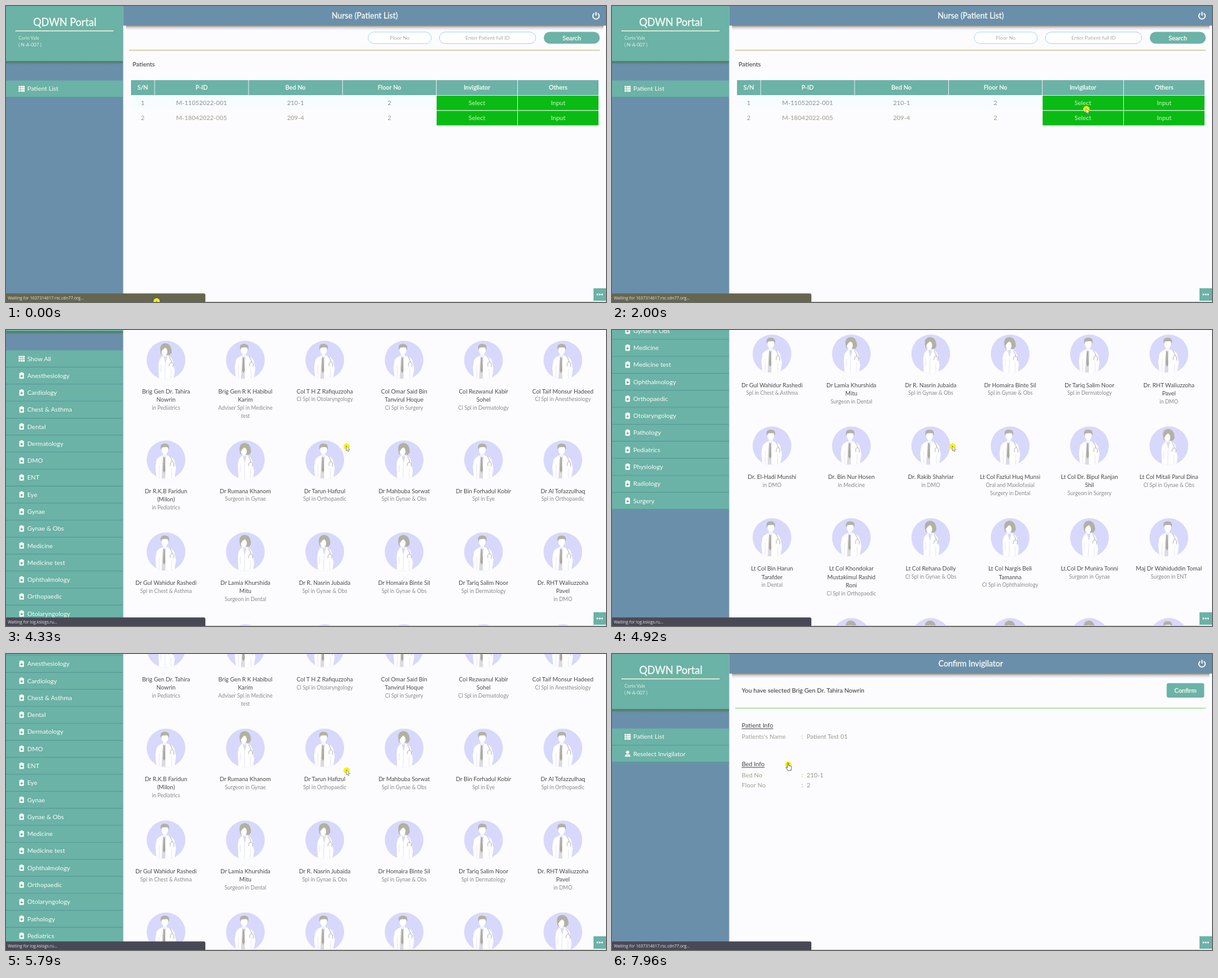
These frames come from a looping animation (960 px wide and 475 px high, 8 s). An HTML page:

```html
<!DOCTYPE html>
<html lang="en">
<head>
<meta charset="utf-8">
<title>Portal</title>
<style>
  html, body { margin: 0; width: 100%; height: 100%; overflow: hidden; background: #fcfcfe; }
  svg { display: block; width: 100vw; height: 100vh; }
  text { font-family: Lato, "Open Sans", sans-serif; white-space: pre; }
  .semi { stroke-width: .28px; }
  .status { font-family: "Open Sans", "Noto Sans", sans-serif; }
</style>
</head>
<body>
<svg id="stage" viewBox="0 0 960 475" xmlns="http://www.w3.org/2000/svg"></svg>
<script>
const TEAL = '#6bb2a7', BLUE = '#6a8fab', PALE = '#fbfdf5', GREEN = '#0abb14';
const LOOP = 8000;

// Markup helpers: text is placed by the middle of its capitals.
const rect = (x, y, w, h, fill, extra = '') =>
  `<rect x="${x}" y="${y}" width="${w}" height="${h}" fill="${fill}" ${extra}/>`;
const text = (x, y, size, str, fill, { mid = false, semi = false, line = false } = {}) =>
  `<text x="${x}" y="${y + size * 0.35}" font-size="${size}" fill="${fill}"` +
  (mid ? ' text-anchor="middle"' : '') +
  (semi ? ` class="semi" stroke="${fill}"` : '') +
  (line ? ' text-decoration="underline"' : '') +
  `>${str.replace(/&/g, '&amp;')}</text>`;
const use = (id, x, y) => `<use href="#${id}" x="${x}" y="${y}"/>`;
const group = (id, body) => `<g id="${id}">${body}</g>`;
const field = (x, y, w, hint, border) =>
  rect(x + .5, y, w - 1, 18.5, '#fff', `rx="9.2" stroke="${border}" stroke-width=".9"`) +
  text(x + w / 2, y + 9.2, 8.2, hint, '#a8a8a8', { mid: true });
const button = (x, y, w, h, r, label) =>
  rect(x, y, w, h, TEAL, `rx="${r}"`) + text(x + w / 2, y + h / 2, 10, label, PALE, { mid: true, semi: true });

const defs = `<defs>
  <linearGradient id="headShade" x2="0" y2="1">
    <stop offset="0" stop-color="#838e9c"/><stop offset=".28" stop-color="#c6ba96"/>
    <stop offset=".5" stop-color="#d9daf2"/><stop offset="1" stop-color="#fcfcfe"/>
  </linearGradient>
  <linearGradient id="sideShade" x2="0" y2="1">
    <stop offset="0" stop-color="#3c7452"/><stop offset=".4" stop-color="#55806f"/><stop offset="1" stop-color="${BLUE}"/>
  </linearGradient>
  <clipPath id="disc"><circle r="31"/></clipPath>
  <g id="m">
    <circle r="31" fill="#d8d8fc"/>
    <g clip-path="url(#disc)">
      <path d="M-15 31L-17 12-15 0Q-13-4-6-7H2Q10-5 13 0L16 14 13 31Z" fill="#fff"/>
      <path d="M-5-6H0L-1 8V30H-7L-6 8Z" fill="#dadae2"/>
      <path d="M-4-4H-2L-1 17-3 21-5 17Z" fill="#aaa99c"/>
      <path d="M-11 8V31M9 14V31" stroke="#e4e4fb" fill="none"/>
    </g>
    <path d="M-5-12H1V-7L-2-4-5-7Z" fill="#f4f4fc"/>
    <ellipse cx="-2" cy="-16" rx="5.4" ry="7" fill="#fff"/>
    <path d="M-8-16Q-11-26-2-26 7-26 4.500-16L3-20Q-2-21-6.500-19.500Z" fill="#b2b1a3"/>
    <path d="M6-6Q10 0 10 3M7 10Q6 3 10 3 14 4 12 11" fill="none" stroke="#aaa" stroke-width=".9"/>
  </g>
  <g id="f">
    <circle r="31" fill="#d8d8fc"/>
    <path d="M-8-9Q-13-26-1-27 9-26 9-12L6-8Z" fill="#b2b1a3"/>
    <g clip-path="url(#disc)">
      <path d="M-11 31L-12 10Q-12-4-4-7H3Q10-4 11 2L14 18 12 31Z" fill="#fff"/>
      <path d="M-4-6L-1 6 2-6Z" fill="#dcdcf0"/>
      <path d="M-1 6L-2 31M-8 8V20M8 14V31" stroke="#e4e4fb" fill="none"/>
    </g>
    <ellipse cx="-2.500" cy="-13.500" rx="4.800" ry="6.500" fill="#fff"/>
    <path d="M-7.500-13Q-5-18 0-21 4-18 4-10L8-11 6-23-3-26-9-18Z" fill="#b2b1a3"/>
    <path d="M5-5Q9 0 9 4M5 10Q5 3 9 4 13 5 11 11" fill="none" stroke="#aaa" stroke-width=".9"/>
  </g>
  <g id="clip">
    <rect x="-3.700" y="-4.300" width="7.400" height="9.400" rx="1" fill="${PALE}"/>
    <rect x="-1.500" y="-5.300" width="3" height="2" rx=".7" fill="${PALE}"/>
    <path d="M-2 1H2M0-1V3" stroke="#5b9d93" stroke-width="1.200"/>
  </g>
  <g id="grid"><path d="M-5-3H5M-5 0.300H5M-5 3.600H5" stroke="${PALE}" stroke-width="2.600" stroke-dasharray="2.900 .65"/></g>
  <g id="list"><path d="M-5-3H5M-5 0.300H5M-5 3.600H5" stroke="${PALE}" stroke-width="2.600" stroke-dasharray="2.900 .65 6.500 0"/></g>
  <g id="person">
    <circle cy="-2.200" r="2.600" fill="${PALE}"/><path d="M-4.500 5Q-4.500 1 0 1 4.500 1 4.500 5Z" fill="${PALE}"/>
    <path d="M0 2V4" stroke="${TEAL}"/>
  </g>
</defs>`;

const menu = items => items.map(([icon, label], i) => {
  const y = 119.5 + i * 27.28;
  return rect(0, y, 187, 27.28, TEAL) + rect(0, y + 26.4, 187, .9, '#4f938f') +
    use(icon, 25, y + 13) + text(34, y + 13.2, 10.1, label, PALE);
}).join('');

function patientPage() {
  const columns = [[200, 37.5, 'S/N'], [238.3, 149.4, 'P-ID'], [388.5, 149.5, 'Bed No'],
    [538.8, 149.4, 'Floor No'], [689, 129, 'Invigilator'], [818.8, 129.2, 'Others']];
  const rows = [['1', 'M-11052022-001', '210-1', '2', 'Select', 'Input'],
    ['2', 'M-18042022-005', '209-4', '2', 'Select', 'Input']];
  let table = rect(200, 143.5, 488, 23.5, '#f7fcff');
  columns.forEach(([x, w, label], c) => {
    const center = x + w / 2;
    table += rect(x, 119, w, 24, TEAL) + text(center, 131, 9.8, label, PALE, { mid: true, semi: true });
    rows.forEach((row, r) => {
      if (c > 3) table += rect(x, 143.8 + r * 24.4, w, 23.4, GREEN);
      table += text(center, 155.5 + r * 24.4, 10.1, row[c], c > 3 ? '#cff3c9' : ['#8f8f92', '#9f9a86'][r], { mid: true });
    });
  });
  return menu([['list', 'Patient List']]) +
    field(579, 41.8, 102, 'Floor No', '#a9d3ef') +
    field(693, 41.8, 155, 'Enter Patient full ID', '#a9c9ef') +
    button(860.5, 41.5, 89.5, 19, 9.5, 'Search') +
    rect(197, 70.3, 753, 1.4, '#c6c492') + text(202.500, 93.5, 10, 'Patients', '#333') + table;
}

// Each row: middle of its pictures, then cards of picture, name lines, specialty lines.
const doctors = [
  [135,
    'f|Brig Gen Dr. Tahira/Nowrin|in Pediatrics', 'm|Brig Gen R K Habibul/Karim|Adviser Spl in Medicine/test',
    'm|Col T H Z Rafiquzzoha|Cl Spl in Otolaryngology', 'm|Col Omar Said Bin/Tanvirul Hoque|Cl Spl in Surgery',
    'm|Col Rezwanul Kabir/Sohel|Cl Spl in Dermatology', 'm|Col Taif Monsur Hadeed|Cl Spl in Anesthesiology'],
  [295,
    'm|Dr R.K.B Faridun/(Milon)|in Pediatrics', 'f|Dr Rumana Khanom|Surgeon in Gynae',
    'm|Dr Tarun Hafizul|Spl in Orthopaedic', 'f|Dr Mahbuba Sorwat|Spl in Gynae & Obs',
    'm|Dr Bin Forhadul Kobir|Spl in Eye', 'm|Dr Al Tofazzulhaq|Spl in Orthopaedic'],
  [442.5,
    'm|Dr Gul Wahidur Rashedi|Spl in Chest & Asthma', 'f|Dr Lamia Khurshida/Mitu|Surgeon in Dental',
    'f|Dr R. Nasrin Jubaida|Spl in Gynae & Obs', 'f|Dr Homaira Binte Sil|Spl in Gynae & Obs',
    'm|Dr Tariq Salim Noor|Spl in Dermatology', 'm|Dr. RHT Waliuzzoha/Pavel|in DMO'],
  [590,
    'm|Dr. El-Hadi Munshi|in DMO', 'm|Dr. Bin Nur Hosen|in Medicine', 'm|Dr. Rakib Shahriar|in DMO',
    'm|Lt Col Fazlul Huq Munsi|Oral and Maxilofasial/Surgery in Dental',
    'm|Lt Col Dr. Bipul Ranjan/Shil|Surgeon in Surgery', 'f|Lt Col Mitali Parul Dina|Cl Spl in Gynae & Obs'],
  [737.3,
    'm|Lt Col Bin Harun/Tarafder|in Dental', 'm|Lt Col Khondokar/Mustakimul Rashid/Roni|Cl Spl in Orthopaedic',
    'f|Lt Col Rehana Dolly|Cl Spl in Gynae & Obs', 'f|Lt Col Nargis Beli/Tamanna|Cl Spl in Ophthalmology',
    'f|Lt.Col Dr Munira Tonni|Surgeon in Gynae', 'm|Maj Dr Wahiduddin Tomal|Surgeon in ENT'],
  [897.5, 'm||', 'f||', 'f||', 'f||', 'f||', 'm||']
];

function doctorPage() {
  const departments = ['Anesthesiology', 'Cardiology', 'Chest & Asthma', 'Dental', 'Dermatology', 'DMO', 'ENT',
    'Eye', 'Gynae', 'Gynae & Obs', 'Medicine', 'Medicine test', 'Ophthalmology', 'Orthopaedic',
    'Otolaryngology', 'Pathology', 'Pediatrics', 'Physiology', 'Radiology', 'Surgery'];
  const cards = doctors.map(([y, ...row]) => row.map((card, c) => {
    const x = 256 + c * 127, [picture, name, specialty] = card.split('|');
    const names = name.split('/'), lines = names.concat(specialty.split('/'));
    return use(picture, x, y) + lines.map((line, i) => i < names.length
      ? text(x, y + 50 + i * 13.4, 9.3, line, '#4a4a4a', { mid: true })
      : text(x, y + 50 + i * 13.2, 8.5, line, '#8a8a8a', { mid: true })).join('');
  }).join('')).join('');
  return menu([['grid', 'Show All'], ...departments.map(d => ['clip', d])]) +
    text(207.5, 61, 9.9, 'Search Doctor', '#777') +
    field(318, 51.7, 562, 'Enter Doctor Name or ID', '#bfc0ee') +
    button(890, 51.7, 50, 18.6, 9.3, 'Search') + cards;
}

function confirmPage() {
  const info = [[132, "Patients's Name", 'Patient Test 01'], [194, 'Bed No', '210-1'], [210.5, 'Floor No', '2']];
  return menu([['list', 'Patient List'], ['person', 'Reselect Invigilator']]) +
    text(207.5, 59, 9.9, 'You have selected Brig Gen Dr. Tahira Nowrin', '#333') +
    button(887.5, 46.7, 60, 23.4, 3, 'Confirm') + rect(197, 86.2, 753, 1.5, '#a9d79a') +
    text(207.5, 115, 9.9, 'Patient Info', '#444', { line: true }) +
    text(207.5, 177, 9.9, 'Bed Info', '#444', { line: true }) +
    info.map(([y, label, value]) => text(207.5, y, 10, label, '#a19d92') +
      text(303, y, 10, ':', '#a19d92') + text(311.5, y, 10, value, '#99968c')).join('');
}

const header = rect(192, 31, 764, 8, 'url(#headShade)') + rect(187.5, 0, 772.5, 31.5, BLUE) +
  text(574, 15.5, 12.7, '', PALE, { mid: true, semi: true }).replace('<text', '<text id="title"') +
  `<path d="M941.200 11.800A5 5 0 1 0 946.800 11.800M944 9.500V15.500" fill="none" stroke="${PALE}" stroke-width="1.800"/>` +
  rect(0, 88, 187, 6, 'url(#sideShade)') + rect(0, 0, 187, 88.5, TEAL) +
  text(94, 26.5, 16.3, 'QDWN Portal', PALE, { mid: true, semi: true }) +
  rect(15, 39.200, 157, 1.500, '#f3f5d8') +
  text(20, 51, 7.4, 'Corin Vale', '#e6f2dc') + text(20, 62, 7.4, '( N-A-007 )', '#e6f2dc');

const overlay = rect(187, 474, 773, 1, '#cfd0d8') + rect(940, 453, 20, 20, TEAL) +
  [946.3, 950, 953.7].map(x => `<circle cx="${x}" cy="463" r="1.400" fill="${PALE}"/>`).join('') +
  group('status', rect(-4, 461.3, 323, 18, '#494956', 'id="bar" rx="2.5"') +
    '<text id="message" class="status" x="3" y="470.800" font-size="6.600" fill="#e4e4e0"></text>') +
  group('cursor', '<circle r="5" fill="#f6f400"/>' +
    '<path id="arrow" d="M-.5-1V7L1.300 5.500 2.500 8.300 3.800 7.700 2.600 5H5.200Z" fill="#fff" stroke="#555" stroke-width=".6"/>' +
    '<path id="hand" d="M-1.300-2.500Q-.3-3.600.6-2.500V1.500L4.500 2.500Q5.500 3 5.300 5L4.300 9.500H-.5L-3.800 4.600Q-3.300 3.200-1.300 5Z" fill="#fff" stroke="#444" stroke-width=".8"/>');

const stage = document.getElementById('stage');
stage.innerHTML = defs + rect(0, 0, 960, 475, '#fcfcfe') + rect(0, 0, 187.5, 475, BLUE) +
  group('scroller', header + group('patients', patientPage()) +
    group('doctors', doctorPage()) + group('confirm', confirmPage())) + overlay;

const el = id => document.getElementById(id);
const show = (id, on) => el(id).setAttribute('display', on ? 'inline' : 'none');

// Keys are [time, value]; each span eases by the given curve.
function tween(keys, t, ease = k => k) {
  const i = keys.findIndex(key => key[0] > t);
  if (i === 0) return keys[0][1];
  if (i < 0) return keys[keys.length - 1][1];
  const [t0, a] = keys[i - 1], [t1, b] = keys[i];
  return a + (b - a) * ease((t - t0) / (t1 - t0));
}
const smooth = k => k * k * (3 - 2 * k);

const cursorKeys = [[130, 241, 474], [940, 190, 212], [1750, 808, 175], [2000, 759, 165.5], [2170, 760.5, 160],
  [3600, 760.5, 160], [4130, 545, 187], [6400, 545, 187], [7100, 282, 177.5]];
const cursorX = cursorKeys.map(([t, x]) => [t, x]);
const cursorY = cursorKeys.map(([t, , y]) => [t, y]);
const scrollKeys = [[4170, 0], [4920, 404], [5040, 430], [5200, 430], [5790, 144.5], [6200, 8], [6380, .6], [6420, 0]];
const statusFade = [[2080, 1], [2170, 0], [2540, 0], [2630, 1]];

const pages = [[0, 'patients', 'Nurse (Patient List)'], [3330, 'doctors', 'Doctor Selection'],
  [7540, 'confirm', 'Confirm Invigilator']];

function draw(t) {
  const page = pages.filter(p => p[0] <= t).pop();
  pages.forEach(p => show(p[1], p === page));
  el('title').textContent = page[2];
  el('scroller').setAttribute('transform', `translate(0 ${-tween(scrollKeys, t)})`);

  el('cursor').setAttribute('transform', `translate(${tween(cursorX, t, smooth)} ${tween(cursorY, t, smooth)})`);
  const pointing = (t > 2080 && t < 3750) || t > 6950;
  show('hand', pointing);
  show('arrow', !pointing);

  el('status').setAttribute('opacity', tween(statusFade, t));
  el('bar').setAttribute('width', t > 2300 && t < 4000 ? 166 : 323);
  el('bar').setAttribute('fill', t < 2300 ? '#66654f' : '#494956');
  el('message').textContent = `Waiting for ${t > 4000 && t < 7540 ? 'log.kslogs.ru' : '1637314617.rsc.cdn77.org'}...`;
}

const start = performance.now();
function frame() {
  draw((performance.now() - start) % LOOP);
  requestAnimationFrame(frame);
}
frame();
</script>
</body>
</html>
```
